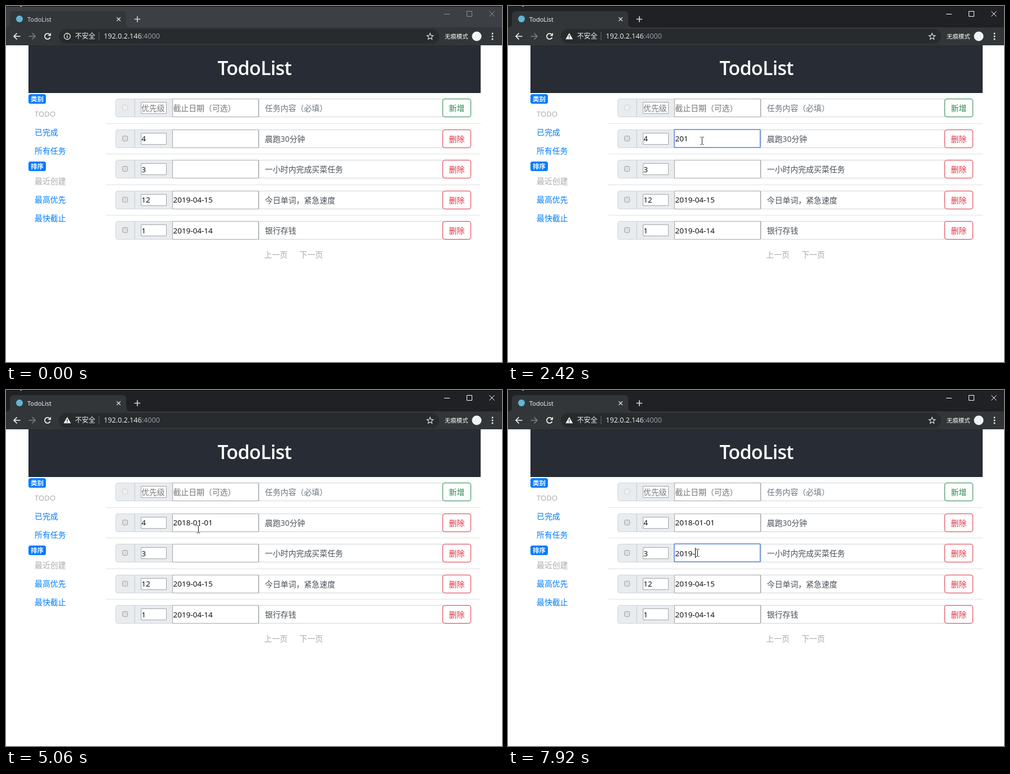
These frames come from a looping animation (883 by 634 pixels, 8000 ms). An HTML page with a canvas:

```html
<!DOCTYPE html>
<html lang="zh-CN">
<head>
<meta charset="utf-8">
<title>TodoList</title>
<style>
html, body { margin: 0; width: 100%; height: 100%; overflow: hidden; background: #fff; }
canvas, svg { position: absolute; left: 0; top: 0; width: 883px; height: 634px; }
text { font-family: "Open Sans", "Noto Sans CJK SC", "Noto Sans CJK", sans-serif; white-space: pre; }
</style>
</head>
<body>
<canvas id="base" width="883" height="634"></canvas>
<svg id="words" viewBox="0 0 883 634"></svg>
<canvas id="top" width="883" height="634"></canvas>
<script>
const LOOP = 8000;
const g = document.getElementById('base').getContext('2d');
const o = document.getElementById('top').getContext('2d');
const words = document.getElementById('words');

const BLUE = '#007bff', RED = '#dc3545', GREEN = '#23854a', MUTED = '#a8a9aa';
const CJK = 13.9, LATIN = 13.5;
const ROWS = [181.5, 236, 290.5, 345, 399.5];

// ---- timeline ----
const ACTIVE = 850, WARN = 1540;
const EDITS = [
  { row: 1, click: 850, focus: 930, blur: 5060, keys: [
    [1540, '2'], [1710, '20'], [1860, '201'], [2570, '2018'], [2950, '2018-'],
    [3180, '2018-0'], [3260, '2018-01'], [3340, '2018-01-'],
    [3580, '2018-01-0'], [3650, '2018-01-01']] },
  { row: 2, click: 6000, focus: 6070, blur: LOOP, keys: [
    [6700, '2'], [6930, '21'], [7310, '2'], [7460, '20'],
    [7700, '201'], [7770, '2019'], [7920, '2019-']] }
];
const MOVES = [
  [4280, 344, 245], [4360, 342, 248], [5610, 342, 255], [5690, 342, 264],
  [5770, 342, 273], [5840, 340, 282], [5920, 337, 290]
];

// ---- text ----
function label(str, x, y, size, fill, opt = {}) {
  const el = document.createElementNS('http://www.w3.org/2000/svg', 'text');
  el.setAttribute('x', x);
  el.setAttribute('y', y);
  el.setAttribute('font-size', size);
  el.setAttribute('fill', fill);
  for (const k in opt) el.setAttribute(k, opt[k]);
  el.textContent = str;
  words.appendChild(el);
  return el;
}
const mid = { 'text-anchor': 'middle' };

const tabTitle = label('TodoList', 38, 27.5, 11, '#fff');
label('不安全', 123, 58, 12, '#f1f3f4');
const host = label('192.0.2.146', 174, 58, 12.6, '#f1f3f4');
const port = document.createElementNS(host.namespaceURI, 'tspan');
port.setAttribute('fill', '#9aa0a6');
port.textContent = ':4000';
host.appendChild(port);
label('无痕模式', 781, 58, 10.4, '#fff');
label('TodoList', 442.3, 123, 34, '#fff',
  { 'text-anchor': 'middle', 'font-weight': 600, 'letter-spacing': -0.7 });

[['类别', 170.3], ['排序', 289.8]].forEach(([s, y]) =>
  label(s, 55.5, y, 11.5, '#fff', { 'text-anchor': 'middle', 'font-weight': 700 }));
label('TODO', 51, 197, 13.2, MUTED);
[['已完成', 225], ['所有任务', 258], ['最近创建', 312], ['最高优先', 344.7], ['最快截止', 377.7]]
  .forEach(([s, y]) => label(s, 51, y + 5.2, CJK, s === '最近创建' ? MUTED : BLUE));

label('优先级', 241, 187, CJK, '#757575');
label('截止日期（可选）', 297.5, 187, CJK, '#757575');
label('任务内容（必填）', 461, 187, CJK, '#6c757d');
label('新增', 802.5, 187, CJK, GREEN, mid);

const dates = [null];
[['4', '', '晨跑30分钟'], ['3', '', '一小时内完成买菜任务'],
 ['12', '2019-04-15', '今日单词，紧急速度'], ['1', '2019-04-14', '银行存钱']]
  .forEach(([rank, date, task], i) => {
    const y = ROWS[i + 1] + 5;
    label(rank, 241.3, y + 0.3, LATIN, '#000');
    dates.push(label(date, 297.5, y + 0.3, LATIN, '#000'));
    label(task, 461, y + 0.5, CJK, '#495057');
    label('删除', 802.5, y + 0.5, CJK, RED, mid);
  });
label('上一页', 459.5, 448.3, CJK, MUTED);
label('下一页', 522.5, 448.3, CJK, MUTED);

// ---- shapes ----
function rect(x, y, w, h, fill) {
  g.fillStyle = fill;
  g.fillRect(x, y, w, h);
}
function box(x, y, w, h, r, fill, line, lw = 1) {
  g.beginPath();
  g.roundRect(x, y, w, h, r);
  if (fill) { g.fillStyle = fill; g.fill(); }
  if (line) { g.strokeStyle = line; g.lineWidth = lw; g.stroke(); }
}
function dot(c, x, y, r, fill) {
  c.beginPath();
  c.arc(x, y, r, 0, Math.PI * 2);
  c.fillStyle = fill;
  c.fill();
}
function lines(color, lw, ...paths) {
  g.strokeStyle = color;
  g.lineWidth = lw;
  g.beginPath();
  for (const p of paths)
    for (let i = 0; i < p.length; i += 2) g[i ? 'lineTo' : 'moveTo'](p[i], p[i + 1]);
  g.stroke();
}
function cross(x, y, r, color, lw) {
  lines(color, lw, [x - r, y - r, x + r, y + r], [x - r, y + r, x + r, y - r]);
}

function titleBar(active) {
  rect(0, 0, 883, 38, active ? '#202124' : '#3c3f43');
  rect(0, 0, 883, 1, '#08090a');
  rect(25, 0, 3, 1, '#d8d8d8');
  g.fillStyle = '#323639';
  g.beginPath();
  g.moveTo(0, 38);
  g.quadraticCurveTo(7, 38, 7, 31);
  g.lineTo(7, 16);
  g.quadraticCurveTo(7, 9, 14, 9);
  g.lineTo(207, 9);
  g.quadraticCurveTo(214, 9, 214, 16);
  g.lineTo(214, 31);
  g.quadraticCurveTo(214, 38, 221, 38);
  g.fill();
  dot(g, 24, 23, 6, '#5fb8d6');
  cross(200.5, 23.5, 3.3, '#d5d7da', 1.4);
  lines('#d5d7da', 1.6, [228.5, 23.5, 239, 23.5], [233.8, 18.2, 233.8, 28.8]);
  const c = active ? '#fff' : '#909295';
  lines(c, 1, [780, 14.5, 790, 14.5]);
  box(820.5, 9.5, 9, 9, 0, null, c);
  cross(865, 14, 4.6, c, 1);
}

function toolbar(warn) {
  rect(0, 38, 883, 32, '#323639');
  box(94, 41, 677, 26, 13, '#282b2e');
  lines('#f1f3f4', 1.7, [25.5, 54, 14, 54], [19.5, 48.5, 14, 54, 19.5, 59.5]);
  lines('#7b7f83', 1.7, [40.5, 54, 52, 54], [46.5, 48.5, 52, 54, 46.5, 59.5]);

  g.strokeStyle = '#f1f3f4';
  g.lineWidth = 1.7;
  g.beginPath();
  g.arc(74, 54, 5, 0.4, 5.4);
  g.stroke();
  g.fillStyle = '#f1f3f4';
  g.beginPath();
  g.moveTo(80, 47.8); g.lineTo(80, 53.2); g.lineTo(74.6, 53.2);
  g.fill();

  if (warn) {
    g.beginPath();
    g.moveTo(109, 48); g.lineTo(115.5, 59.3); g.lineTo(102.5, 59.3);
    g.fill();
    rect(108.4, 52, 1.3, 3.6, '#282b2e');
    rect(108.4, 56.5, 1.3, 1.3, '#282b2e');
  } else {
    g.lineWidth = 1.3;
    g.beginPath();
    g.arc(109, 54, 5.5, 0, Math.PI * 2);
    g.stroke();
    rect(108.3, 53, 1.4, 4, '#f1f3f4');
    rect(108.3, 50.6, 1.4, 1.4, '#f1f3f4');
  }
  rect(165, 46, 1, 15, '#5f6368');

  g.beginPath();
  for (let i = 0; i < 10; i++) {
    const r = i % 2 ? 2.7 : 6, a = i * Math.PI / 5 - Math.PI / 2;
    g.lineTo(755 + r * Math.cos(a), 54.5 + r * Math.sin(a));
  }
  g.closePath();
  g.strokeStyle = '#d5d7da';
  g.lineWidth = 1.2;
  g.stroke();
  dot(g, 838, 54, 8.5, '#f1f3f4');
  [49, 54, 59].forEach(y => dot(g, 866, y, 1.5, '#f1f3f4'));
}

function row(i, y, focused) {
  const t = Math.round(y - 16.5) + 0.5, h = 32;
  box(195.5, t, 33.5, h, [3.5, 0, 0, 3.5], '#e9ecef', '#ced4da');
  box(229.5, t, 67, h, 0, '#e9ecef', '#ced4da');
  box(450.5, t, 327, h, 0, '#fff', '#ced4da');
  box(207.5, t + 11, 9, 9, 2, i ? '#dfdfdf' : '#eeeff0', i ? '#a0a0a0' : '#cfd1d3');
  box(240.5, t + 6, 45, 20, 0, '#fff', '#a5a5a5');
  box(296.5, t, 153, h, 0, '#fff', '#a5a5a5');
  if (focused) box(296, t - 0.5, 153, h, 0.5, null, '#7d9fdb', 2);
  box(777.5, t, 50, h, 3.5, '#fff', i ? RED : GREEN);
  if (i < 4) rect(178, Math.round(y + 27), 667, 1, '#e0e1e2');
}

function pointer(x, y) {
  o.beginPath();
  [[0, 0], [0, 13.5], [3, 10.8], [5.2, 15.8], [7.4, 14.8], [5.2, 10], [9.4, 10]]
    .forEach(([a, b]) => o.lineTo(x + a + 0.5, y + b));
  o.closePath();
  o.fillStyle = '#fff';
  o.fill();
  o.strokeStyle = '#111';
  o.lineWidth = 1;
  o.stroke();
}
function beam(px, py) {
  const x = Math.floor(px) + 0.5, y = Math.round(py);
  o.beginPath();
  for (const s of [-1, 1]) {
    o.moveTo(x - 3, y + 6.5 * s);
    o.lineTo(x - 1, y + 6.5 * s);
    o.lineTo(x, y + 5.5 * s);
    o.lineTo(x + 1, y + 6.5 * s);
    o.lineTo(x + 3, y + 6.5 * s);
  }
  o.moveTo(x, y - 5.5);
  o.lineTo(x, y + 5.5);
  o.strokeStyle = '#222';
  o.lineWidth = 1;
  o.stroke();
}

// ---- state at time t ----
function mouse(t) {
  if (t < 70) return null;
  const p = Math.min(1, Math.floor((t - 70) / 78) / 8);
  const ease = 1 - (1 - p) ** 2;
  let at = [330 + 15 * ease, 605 - 365 * ease];
  for (const [when, x, y] of MOVES) if (t >= when) at = [x, y];
  return at;
}
const overField = (x, y) =>
  x > 296 && x < 777 && ROWS.some(r => Math.abs(y - r) < 16);

function edit(e, t) {
  let value = '', last = e.click - 10;
  for (const [when, s] of e.keys) if (t >= when) { value = s; last = when; }
  const focused = t >= e.focus && t < e.blur;
  return { value, focused, caret: focused && Math.floor((t - last) / 550) % 2 === 0 };
}

function draw(t) {
  const active = t >= ACTIVE;
  const states = EDITS.map(e => edit(e, t));
  rect(0, 0, 883, 634, '#fff');
  titleBar(active);
  toolbar(t >= WARN);
  tabTitle.setAttribute('fill', active ? '#fff' : '#dfe1e3');
  rect(40, 70, 805, 85, '#282c34');
  box(40, 157, 31, 17, 3.5, BLUE);
  box(40, 277, 31, 17, 3.5, BLUE);
  ROWS.forEach((y, i) =>
    row(i, y, EDITS.some((e, k) => e.row === i && states[k].focused)));

  o.clearRect(0, 0, 883, 634);
  o.font = LATIN + 'px "Open Sans", sans-serif';
  EDITS.forEach((e, k) => {
    const s = states[k], el = dates[e.row];
    if (el.textContent !== s.value) el.textContent = s.value;
    if (s.caret) {
      o.fillStyle = '#000';
      o.fillRect(Math.floor(298 + o.measureText(s.value).width), Math.round(ROWS[e.row] - 9.5), 1, 18);
    }
  });
  const m = mouse(t);
  if (!m) return;
  const [x, y] = m;
  if (EDITS.some(e => t >= e.click && t < e.focus)) dot(o, x - 1, y - 1, 10.5, '#fbf76c');
  (overField(x, y) ? beam : pointer)(x, y);
}

const start = performance.now();
function tick() {
  draw((performance.now() - start) % LOOP);
  requestAnimationFrame(tick);
}
tick();
</script>
</body>
</html>
```
